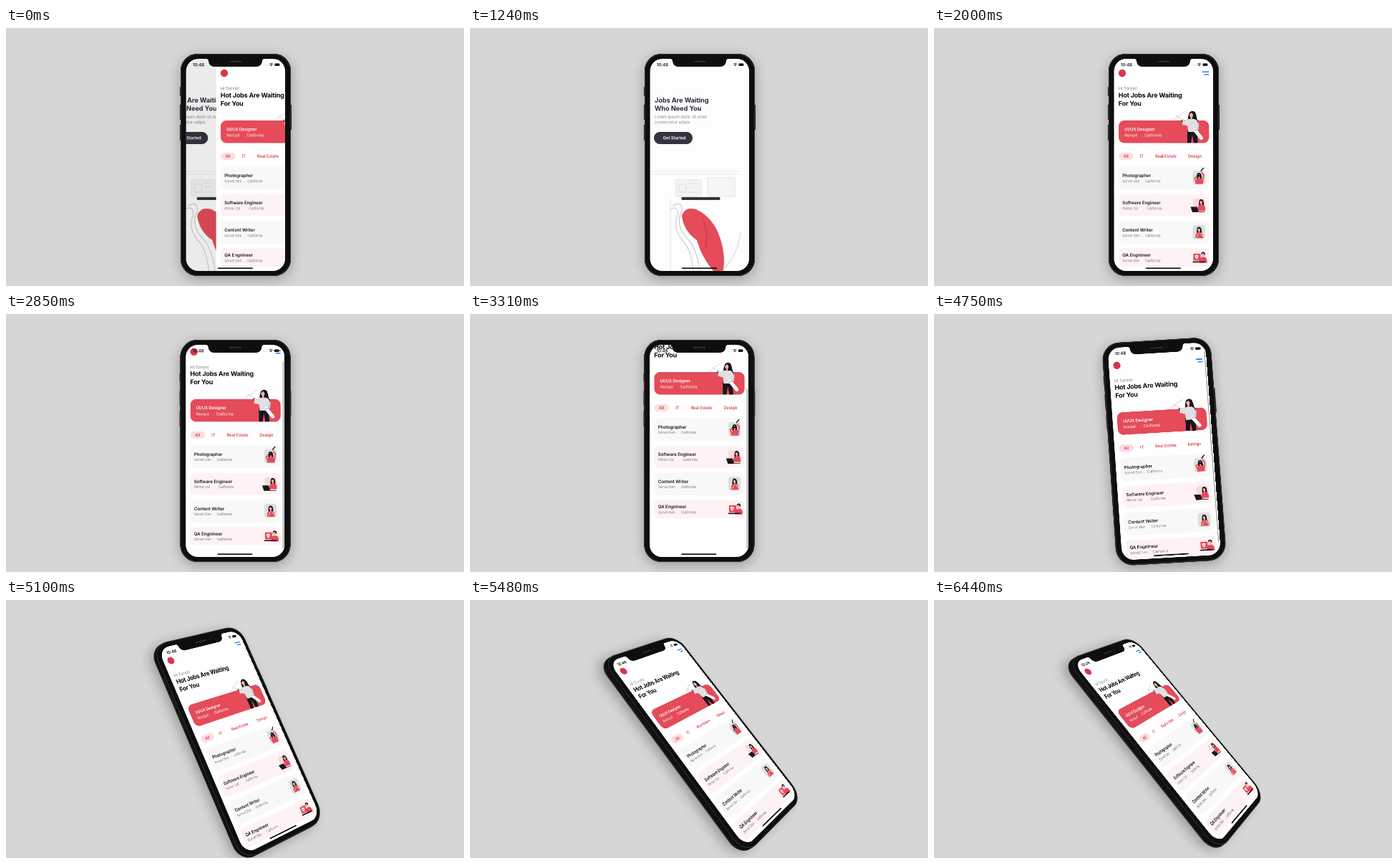
An HTML page for the animation above (6470 ms loop, 640 by 360 pixels).

```html
<!DOCTYPE html>
<html lang="en">
<head>
<meta charset="utf-8">
<title>Job finder app</title>
<style>
  html, body { margin: 0; width: 100%; height: 100%; overflow: hidden; background: #d6d6d6; }
  #stage { position: relative; width: 640px; height: 360px; overflow: hidden; }
  #stage > * { position: absolute; left: 0; top: 0; }
  #face { width: 1280px; height: 720px; transform-origin: 0 0; will-change: transform; }
  svg { display: block; font-family: Inter, "Open Sans", sans-serif; }
  .bold { font-weight: 700; }
  .semi { font-weight: 600; }
</style>
</head>
<body>
<div id="stage">
  <svg id="body" width="640" height="360" viewBox="0 0 640 360">
    <defs><filter id="soft" x="-40%" y="-30%" width="180%" height="160%"><feGaussianBlur stdDeviation="9"/></filter></defs>
  </svg>
  <div id="face"></div>
</div>
<script>
const LOOP = 6470;
const WIDTH = 138;
const $ = id => document.getElementById(id);

const rect = (x, y, w, h, r, fill, extra = '') =>
  `<rect x="${x}" y="${y}" width="${w}" height="${h}" rx="${r}" fill="${fill}" ${extra}/>`;
const path = (d, fill, extra = '') => `<path d="${d}" fill="${fill}" ${extra}/>`;
const line = (d, color, width = 1) =>
  path(d, 'none', `stroke="${color}" stroke-width="${width}" stroke-linecap="round"`);
const dot = (x, y, r, fill) => `<circle cx="${x}" cy="${y}" r="${r}" fill="${fill}"/>`;
const oval = (x, y, rx, ry, fill) => `<ellipse cx="${x}" cy="${y}" rx="${rx}" ry="${ry}" fill="${fill}"/>`;
const text = (x, y, size, str, fill, cls = '', extra = '') =>
  `<text x="${x}" y="${y}" font-size="${size}" fill="${fill}" class="${cls}" ${extra}>${str}</text>`;

const RED = '#e54b59', INK = '#17171c', SKIN = '#f0b49c', GREY = '#77777c';

// Small half-length figure, centred on the head
function person(x, y, longHair) {
  const hair = longHair
    ? path('M-3.6 6Q-5 -5 0 -4.6Q5 -4 4 7Z', INK)
    : path('M-3 0Q-3.4 -4 0 -4Q4 -4 3 1Z', INK);
  return `<g transform="translate(${x} ${y}) scale(.86)">` + hair +
    path('M-6 13.5Q-6.5 4.5 -1 4.2H2Q7 4.5 6.5 13.5Z', RED) +
    rect(-1, 1.5, 2, 3.6, 1, SKIN) + oval(-.3, 0, 2.2, 2.8, SKIN) +
    path('M-2.8 -.8Q-2 -4 1 -3.8Q3 -3 2.4 0Q.5 -1 0 -2.4Z', INK) + '</g>';
}

const pictures = [
  rect(361.5, 199, 17.5, 19.5, 4, '#dededf') + person(370.5, 206, true) +
    rect(367, 205, 5, 2.6, 1, INK) + line('M366 214L364.2 209.5L367 207.5M375.5 214L377 205L374 202', RED, 1.6) +
    line('M373 199.5L376.5 195.5', INK, 1.4),
  rect(362, 238, 17, 18, 4, '#f7d9dc') + person(373.5, 243, true) +
    path('M358.5 249.5H367.5L370 257H361Z', INK) + line('M368 256.5H378', '#3a3a42', .9),
  rect(361.5, 275, 17.5, 19.5, 4, '#dededf') + person(370.5, 281.5, true) +
    line('M367 291.5L369.5 287.5M375.5 290.5L372.5 286.5', SKIN, 1.2),
  rect(361.5, 313.5, 17.5, 13.5, 3, '#f9dfe2') + person(376, 316, false) +
    rect(362.5, 315, 10, 9.5, 1.2, RED) +
    path('M367 316.7L369.4 317.5Q369.4 321 367 322.8Q364.6 321 364.6 317.5Z', '#fff') +
    dot(367, 319.5, .9, RED) + rect(361.5, 325.6, 17.5, 1.6, .6, INK)
];

const jobs = [
  ['Photographer', 'Sorvel Den', 193, 32, 206],
  ['Software Engineer', 'Plimor Ltd', 232, 30.5, 244],
  ['Content Writer', 'Sorvel Den', 269, 32, 282],
  ['QA Engnineer', 'Sorvel Den', 307.5, 25.5, 317]
];

function jobCard([title, firm, top, height, mid], i) {
  const shift = i === 1 ? 2 : 0;
  return rect(258, top, 126, height, i === 3 ? 5 : 7, i % 2 ? '#fef2f4' : '#f8f8f8') +
    text(263.3, mid + 2.2, 6, title, INK, 'semi') +
    text(263.3, mid + 9.3, 4.65, firm, GREY) +
    text(290.2 + shift, mid + 9.3, 4.65, '.', GREY) +
    text(295.2 + shift, mid + 9.3, 4.75, 'California', GREY) + pictures[i];
}

const designer =
  line('M334 128L352 116M338 122L351 130', '#b9b3b8', .5) + dot(348, 129.5, 2, INK) +
  path('M355.5 131Q354 125 356.5 119Q360 113.5 365 117.5Q367 122 367.5 127Q370.5 131 368 135Z', INK) +
  path('M354 142H367.5L368.5 160.5H363L361 149L359 160.5H354Z', INK) +
  path('M350 132Q353 126 359 127H364Q369 128 369.5 137L367.5 145H355L354.5 137L347 134Z', '#dfe0e5') +
  line('M354 128L348.5 133L348.5 129', '#dfe0e5', 2.6) +
  rect(358.5, 123, 2.6, 5, 1, SKIN) + oval(359.5, 121, 2.7, 3.6, SKIN) +
  path('M356.3 121Q356.5 116 361 116.2Q364.5 117 363.2 124Q362 120 360 118Z', INK) +
  line('M364 142L373.5 153.5', '#fff', 5) + line('M369.3 134L368.5 141L363 143', '#cfd0d7', 2.3);

const jobsPage =
  dot(263, 63, 5.2, '#d93646') +
  line('M375.5 61.3H383.7M378.2 65H383.7', '#2a7de1', 1.5) +
  text(257.8, 86.6, 5.8, 'Hi Torvin!', GREY) +
  text(257.8, 96.9, 9, 'Hot Jobs Are Waiting', '#09090b', 'bold', 'letter-spacing="-.18"') +
  text(257.8, 108.3, 9, 'For You', '#09090b', 'bold', 'letter-spacing="-.18"') +
  rect(258, 129, 126.3, 31.5, 8, RED) +
  text(266.3, 143.4, 5.7, 'UI/UX Designer', '#fff', 'semi') +
  text(266.3, 151.7, 5.3, 'Norquil', '#fff') + text(290, 151.7, 5.3, '.', '#fff') +
  text(294.3, 151.7, 5.3, 'California', '#fff') + designer +
  rect(258, 174, 20.5, 10, 5, '#fcdde1') +
  [['All', 268.2], ['IT', 290.3], ['Real Estate', 324], ['Design', 364.5]]
    .map(([s, x]) => text(x, 181.1, 5.6, s, '#df4150', 'semi', 'text-anchor="middle"')).join('') +
  jobs.map(jobCard).join('');

const welcomePage =
  rect(251, 42, 140, 298, 0, '#fdfdfd') +
  text(258, 104, 9.1, 'Jobs Are Waiting', '#2b2b38', 'bold') +
  text(258, 115.5, 9.1, 'Who Need You', '#2b2b38', 'bold') +
  text(258, 126.2, 5.7, 'Lorem ipsum dolor sit amet', '#8b8b90') +
  text(258, 133.6, 5.7, 'consectetur adipis', '#8b8b90') +
  rect(257, 145, 54, 17, 8.5, '#34343f') +
  text(301.5, 155.3, 5.8, 'Get Started', '#fff', 'semi', 'text-anchor="end"') +
  line('M252 200H376M252 204H376M280 240V339', '#dedede', .8) +
  rect(288, 212, 35, 23, 1, '#f4f4f4', 'stroke="#dcdcdc" stroke-width=".8"') +
  line('M292 218H302V229H292ZM306 217H319M306 222H316M306 229H319', '#d9d9d9', .7) +
  rect(332, 209, 38, 26, 1, '#f6f6f6', 'stroke="#dcdcdc" stroke-width=".8"') +
  rect(295.5, 236, 54, 4, 1.5, '#34343f') +
  line('M284 248Q297 240 296 256Q286 274 304 294Q317 308 321 339M281 252Q292 248 290 262Q282 280 300 300Q310 314 312 339', '#b9b9bd', .8) +
  path('M296 262Q300 249 316 253Q335 262 345 282Q358 310 354 339H340Q323 318 317 296Q299 284 296 262Z', RED) +
  line('M326 268Q333 288 329 308', '#b83442', .8) +
  line('M352 339Q374 318 378 286', '#c9c9cd', .8);

const statusBar =
  text(269, 53.4, 5.9, '10:48', INK, 'semi', 'text-anchor="middle"') +
  [361, 363, 365, 367].map(x => dot(x, 52, .45, '#aaa')).join('') +
  line('M368.6 50.2Q370.7 48.7 372.8 50.2M369.7 51.6Q370.7 50.9 371.7 51.6', INK, .9) + dot(370.7, 52.5, .6, INK) +
  rect(375.5, 49.4, 6.6, 3.6, 1, INK) + rect(382.4, 50.5, .6, 1.4, .3, INK);

// Drawn at double size so that the tilted screen stays smooth
$('face').innerHTML =
  `<svg width="1280" height="720" viewBox="0 0 640 360"><defs><clipPath id="glass">
  <rect x="251.6" y="43" width="138.4" height="296" rx="17"/></clipPath></defs>` +
  `<g clip-path="url(#glass)"><g id="welcome">${welcomePage}</g>` +
  rect(251, 42, 140, 298, 0, '#000', 'id="dim"') +
  `<g id="jobs">${rect(251.6, 42, 140, 298, 0, '#fff')}<g id="list">${jobsPage}</g></g>` +
  rect(387.3, 56, 1.3, 270, .6, '#8c8c8c', 'id="thumb"') + statusBar +
  rect(296, 334.4, 49, 1.6, .8, '#0a0a0a') + '</g>' +
  path('M278 42.5Q283 43 283 46Q284 54 292 54H349Q357 54 358 46Q358 43 363 42.5Z', '#0e0e0e') +
  rect(312, 45.8, 18, 1.8, .9, '#2e2e2e') + dot(336, 46.7, 1.1, '#1c2233') + '</svg>';

// Phone body: each part is an outline at some depth behind the screen
const shell = (depth, fill, inset = 0) => ({ depth, fill, inset });
const button = (x, y, h) => ({ depth: .5, fill: '#1d1d1d', box: [x, y, 2, h, .8] });
const parts = [
  shell(1, '#2b2b2b'), shell(.8, '#111'), shell(.6, '#111'), shell(.4, '#111'), shell(.2, '#111'),
  button(243, 82, 13), button(243, 107, 21), button(243, 135, 22), button(397, 107, 35),
  shell(0, '#343434'), shell(0, '#0e0e0e', 1)
];
$('body').insertAdjacentHTML('beforeend',
  path('', '#000', 'id="shadow" opacity=".3" filter="url(#soft)"') + parts.map(p => path('', p.fill, 'class="part"')).join(''));
document.querySelectorAll('.part').forEach((el, i) => parts[i].el = el);

const clamp = v => Math.min(1, Math.max(0, v));
const mix = (a, b, u) => a + (b - a) * u;

// Monotone cubic through [time, value] keys
function track(keys, t) {
  const last = keys.length - 1;
  if (t <= keys[0][0]) return keys[0][1];
  if (t >= keys[last][0]) return keys[last][1];
  const i = keys.findIndex(k => k[0] > t) - 1;
  const slope = j => j < 0 || j >= last ? 0 : (keys[j + 1][1] - keys[j][1]) / (keys[j + 1][0] - keys[j][0]);
  const tangent = j => {
    const a = slope(j - 1), b = slope(j);
    return a * b > 0 ? 2 * a * b / (a + b) : 0;
  };
  const [t0, v0] = keys[i], [t1, v1] = keys[i + 1], d = t1 - t0, u = (t - t0) / d;
  const s = u * u * (3 - 2 * u);
  return mix(v0, v1, s) + d * (u * (1 - u) * (1 - u) * tangent(i) - u * u * (1 - u) * tangent(i + 1));
}

const slideKeys = [[0, 42], [200, 100], [420, 132], [700, 138], [1290, 138], [1400, 104], [1550, 36], [1700, 8], [1870, 0]];
const scrollKeys = [[2640, 0], [3000, 22], [3310, 48], [3500, 54], [3950, 17], [4140, 6.5], [4400, 0], [4750, -5], [5150, 0]];

const linear = u => u;
const cubicIn = u => u ** 3;
const swing = u => .93 * u * (1 - u) ** 2 + u * u * (3 - 2 * u) - .05 * u * u * (1 - u);

// Screen corners clockwise from top left, roll in degrees,
// solid: offset of the back of the phone and width of the right rim
const flat = [[251, 42], [390, 42], [390, 339], [251, 339]];
const eased = [[250.5, 42], [389.3, 42], [389.3, 339], [250.5, 339]];
const poses = [
  { t: 2000, q: flat, roll: 0, solid: [0, 0, 8] },
  { t: 3000, q: eased, roll: 0, solid: [0, 0, 8], ease: linear },
  { t: 4450, q: eased, roll: 0, solid: [0, 0, 8], ease: linear },
  { t: 4750, q: [[242, 46.7], [379, 38.4], [401, 335.8], [262.4, 343.7]], roll: 3.8, solid: [-.5, .5, 7.5], ease: cubicIn },
  { t: 5480, q: [[192.6, 85.6], [288.8, 53.6], [458.8, 272.2], [384.6, 345.4]], roll: 34, solid: [-6.5, 4, 4], ease: swing },
  { t: 6440, q: [[193.4, 86.5], [279.6, 55.5], [457.2, 268.8], [396.7, 340.8]], roll: 36, solid: [-6.5, 4.5, 3.5], ease: linear }
];

function turn([x, y], degrees) {
  const a = degrees * Math.PI / 180, c = Math.cos(a), s = Math.sin(a), dx = x - 320, dy = y - 190;
  return [320 + dx * c + dy * s, 190 - dx * s + dy * c];
}

function poseAt(t) {
  if (t <= poses[0].t) return poses[0];
  let i = poses.findIndex(p => p.t > t);
  if (i < 0) i = poses.length - 1;
  const a = poses[i - 1], b = poses[i], u = b.ease(clamp((t - a.t) / (b.t - a.t)));
  const roll = mix(a.roll, b.roll, u);
  const q = a.q.map((p, k) => {
    const m = turn(p, -a.roll), n = turn(b.q[k], -b.roll);
    return turn([mix(m[0], n[0], u), mix(m[1], n[1], u)], roll);
  });
  return { q, solid: a.solid.map((v, k) => mix(v, b.solid[k], u)) };
}

// Perspective taking the flat screen to four corners, for CSS and for single points
function perspective([[x0, y0], [x1, y1], [x2, y2], [x3, y3]]) {
  const sx = x0 - x1 + x2 - x3, sy = y0 - y1 + y2 - y3;
  const ax = x1 - x2, ay = y1 - y2, bx = x3 - x2, by = y3 - y2, den = ax * by - bx * ay;
  const g = (sx * by - bx * sy) / den, h = (ax * sy - sx * ay) / den;
  const a = x1 - x0 + g * x1, b = x3 - x0 + h * x3, d = y1 - y0 + g * y1, e = y3 - y0 + h * y3;
  const m = [a, d, 0, g, b, e, 0, h, 0, 0, 1, 0, x0, y0, 0, 1].map(v => v.toFixed(9));
  return {
    css: `matrix3d(${m}) scale(${1 / 139}, ${1 / 297}) translate(-251px, -42px) scale(.5)`,
    point(x, y) {
      const u = (x - 251) / 139, v = (y - 42) / 297, w = g * u + h * v + 1;
      return [(a * u + b * v + x0) / w, (d * u + e * v + y0) / w];
    }
  };
}

function outline([x, y, w, h, r], point, dx, dy) {
  const centres = [[x + w - r, y + h - r], [x + r, y + h - r], [x + r, y + r], [x + w - r, y + r]];
  const points = centres.flatMap(([cx, cy], k) => Array.from({ length: 11 }, (_, i) => {
    const angle = (k + i / 10) * Math.PI / 2;
    const [px, py] = point(cx + r * Math.cos(angle), cy + r * Math.sin(angle));
    return `${(px + dx).toFixed(2)} ${(py + dy).toFixed(2)}`;
  }));
  return `M${points.join('L')}Z`;
}

function draw(t) {
  const slide = track(slideKeys, t), cover = 1 - slide / WIDTH, scroll = track(scrollKeys, t);
  $('jobs').setAttribute('transform', `translate(${slide} 0)`);
  $('welcome').setAttribute('transform', `translate(${-.3 * WIDTH * cover} 0)`);
  $('dim').setAttribute('opacity', .1 * cover);
  $('list').setAttribute('transform', `translate(0 ${-scroll})`);

  const top = 56 + Math.max(0, scroll);
  $('thumb').setAttribute('y', top);
  $('thumb').setAttribute('height', 327 + Math.min(0, scroll) - top);
  $('thumb').setAttribute('opacity', .8 * clamp((t - 2640) / 150) * clamp((5150 - t) / 250));

  const { q, solid: [dx, dy, rim] } = poseAt(t), view = perspective(q);
  const shellBox = inset => [244 + inset, 36 + inset, 146 + rim - 2 * inset, 310 - 2 * inset, 24 - inset];
  $('face').style.transform = view.css;
  $('shadow').setAttribute('d', outline(shellBox(0), view.point, dx * 2, 4 + dy * .5));
  for (const { el, depth, box, inset } of parts) {
    el.setAttribute('d', outline(box || shellBox(inset), view.point, dx * depth, dy * depth));
  }
}

const start = performance.now();
function tick() {
  draw((performance.now() - start) % LOOP);
  requestAnimationFrame(tick);
}
tick();
</script>
</body>
</html>
```
